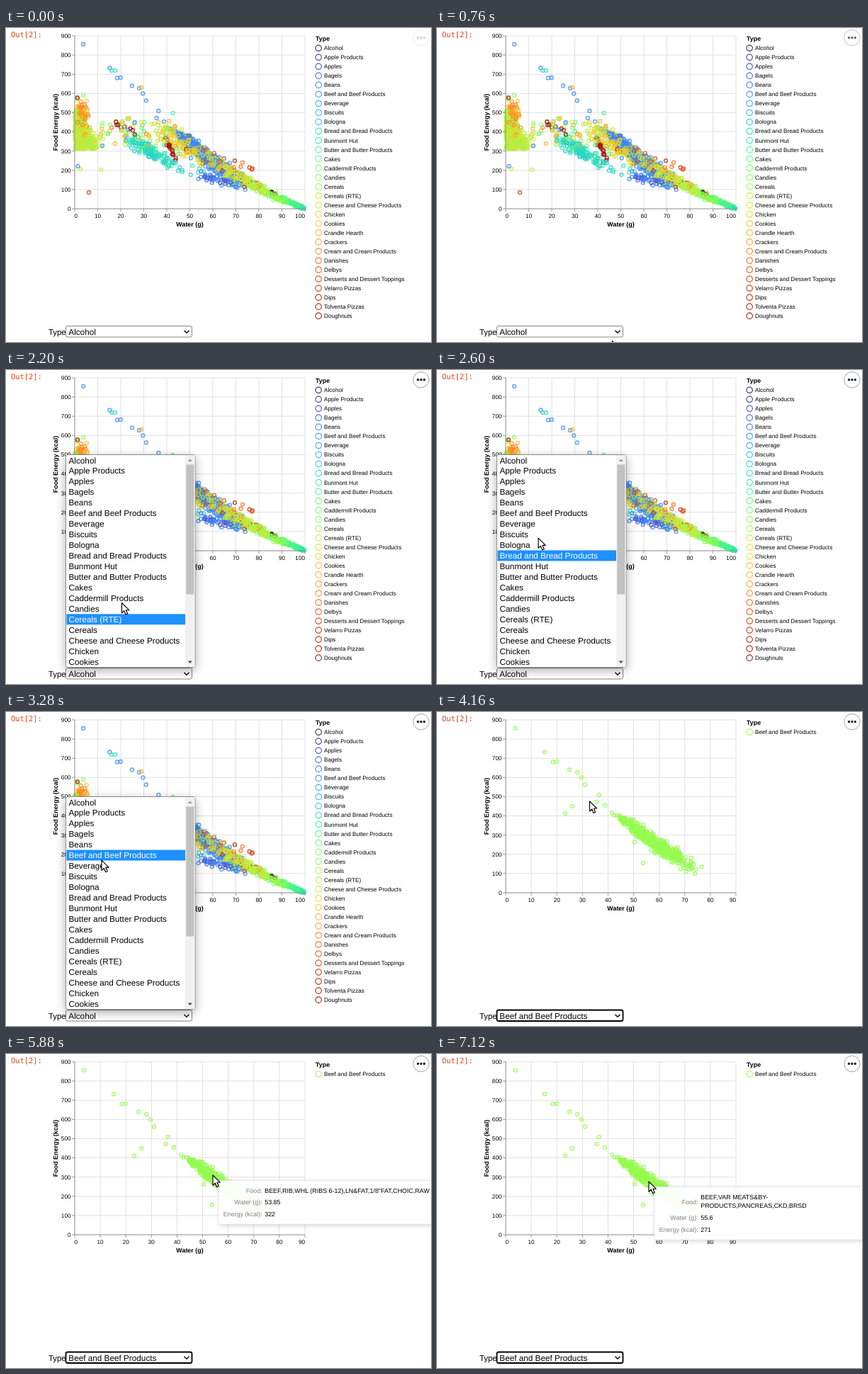
Recreate the animation shown at these times as an HTML page with a canvas. Size 600 px wide and 443 px high, loop 7200 ms.

```html
<!DOCTYPE html>
<html lang="en">
<head>
<meta charset="utf-8">
<title>Food energy by water content</title>
<style>
html, body { margin: 0; width: 100%; height: 100%; overflow: hidden; background: #fff; }
canvas, svg { position: absolute; left: 0; top: 0; width: 600px; height: 443px; }
text { font-family: "Liberation Sans", Arial, sans-serif; white-space: pre; text-rendering: geometricPrecision; }
.small { font-size: 8.2px; }
.bold { font-size: 8.94px; font-weight: bold; }
.tip { font-size: 8.94px; }
.form { font-size: 11.75px; }
.out { font: 10.4px "DejaVu Sans Mono", monospace; fill: #d84315; }
#list { filter: drop-shadow(0 4px 7px rgba(0,0,0,.33)); }
#tip rect { filter: drop-shadow(2px 2px 3px rgba(0,0,0,.14)); }
</style>
</head>
<body>
<canvas id="allPoints" width="600" height="443"></canvas>
<canvas id="beefPoints" width="600" height="443"></canvas>
<svg id="stage" viewBox="0 0 600 443"></svg>
<script>
const LOOP = 7200, STEP = 40;
const HOVER = 640, OPEN = 1720, PICK = 3360;
const L = 97, R = 422, T = 11, B = 255;
const ROW = 14.97, LIST_TOP = 120;

const types = ['Alcohol', 'Apple Products', 'Apples', 'Bagels', 'Beans', 'Beef and Beef Products',
  'Beverage', 'Biscuits', 'Bologna', 'Bread and Bread Products', 'Bunmont Hut',
  'Butter and Butter Products', 'Cakes', 'Caddermill Products', 'Candies', 'Cereals',
  'Cereals (RTE)', 'Cheese and Cheese Products', 'Chicken', 'Cookies', 'Crandle Hearth',
  'Crackers', 'Cream and Cream Products', 'Danishes', 'Delbys', 'Desserts and Dessert Toppings',
  'Velarro Pizzas', 'Dips', 'Tolventa Pizzas', 'Doughnuts'];
const BEEF = 5;
const options = types.slice(0, 20);
[options[15], options[16]] = [options[16], options[15]];

const clamp = (v, a, b) => Math.max(a, Math.min(b, v));

// Colour scale
const stops = ['2c1a3a', '44409a', '4569ee', '3295f7', '26bce1', '29dcbc', '3ff393', '65fd6e', '95fb51',
  'c5ec3c', 'e6d62e', 'ffad24', 'ff841e', 'f2570f', 'cc3509', 'a81e05', '820a00']
  .map(h => [0, 2, 4].map(i => parseInt(h.slice(i, i + 2), 16)));
function turbo(u) {
  const p = u * (stops.length - 1), i = Math.min(Math.floor(p), stops.length - 2);
  return `rgb(${stops[i].map((c, k) => Math.round(c + (stops[i + 1][k] - c) * (p - i)))})`;
}
const typeColor = i => turbo(i / (types.length - 1));

// Seeded noise
let seed = 7;
function rnd() {
  seed = (seed + 0x6D2B79F5) | 0;
  let a = Math.imul(seed ^ (seed >>> 15), 1 | seed);
  a = (a + Math.imul(a ^ (a >>> 7), 61 | a)) ^ a;
  return ((a ^ (a >>> 14)) >>> 0) / 4294967296;
}
const gauss = () => (rnd() + rnd() + rnd() - 1.5) * 2;

// Piecewise linear lookup in rows of [key, value, value...]
function along(rows, k) {
  let i = 1;
  while (i < rows.length - 1 && rows[i][0] < k) i++;
  const a = rows[i - 1], b = rows[i];
  const u = clamp((k - a[0]) / (b[0] - a[0]), 0, 1);
  return a.slice(1).map((v, j) => v + (b[j + 1] - v) * u);
}

// Beef, in pixels of the 0-90 axis: lean outliers, then the dense band
const beef = [[110.5, 23], [152, 56.5], [163.5, 70.5], [169, 70], [187, 81.5], [198, 85], [204, 92.5],
  [209, 102.5], [228.5, 117], [225.5, 127], [237, 132], [191, 133], [181, 143.5], [291, 213], [279, 183.5]];
for (let i = 0; i < 10; i++) beef.push([247 + 3.6 * i, 144 + i * 1.3 + gauss() * 2]);
const beefLine = [[258, 150], [300, 181], [357, 215], [412, 237]];
for (let i = 0; i < 460; i++) {
  const x = clamp(305 + gauss() * 26, 258 + 8 * rnd(), 408);
  beef.push([x, along(beefLine, x)[0] + gauss() * Math.min(5.5, 2 + (x - 258) / 8)]);
}

// All foods, in pixels of the 0-100 axis
const dots = beef.map(([x, y]) => ({ type: BEEF, x: L + (x - L) * 0.9, y, z: rnd() * 0.75 }));
function scatter(n, type, spread, place) {
  for (let i = 0; i < n; i++) {
    const u = rnd(), [x, y] = place(u);
    dots.push({
      type: clamp(Math.round(type(u) + gauss() * spread), 0, types.length - 1),
      x: Math.min(L + Math.abs(x - L), 421), y: Math.min(y, 254.5), z: rnd()
    });
  }
}
const only = type => () => type;
const band = x => along([[215, 143], [255, 167], [300, 193], [340, 217], [380, 237], [421, 254.5]], x)[0];

// main band: yellow at the dry end, green to cyan towards pure water
scatter(620, u => 18 - 8 * u ** 3, 1.1, u => {
  const x = 215 + 206 * u ** 0.85;
  return [x, band(x) + gauss() * (0.8 + (421 - x) * 0.04)];
});
scatter(45, only(24), 1.8, u => { const x = 250 + 110 * u; return [x, band(x) - 4 + gauss() * 8]; });
scatter(45, only(4), 0.8, u => [272 + 55 * u, 207 + 14 * u + gauss() * 3]);
scatter(6, only(0), 0.5, u => [374 + 9 * u, 231 + 5 * u]);
// dry goods with a hard lower edge
scatter(400, only(16), 1.2, () => {
  const x = L + Math.abs(gauss()) * 15;
  return [x, 171 - Math.abs(gauss()) * (9 + 25 * Math.exp((L - x) / 12))];
});
scatter(75, only(21), 1.3, () => [108 + gauss() * 5, 127 + gauss() * 11]);
// breads, and the sparse middle
scatter(115, only(9), 0.8, () => { const x = 203 + gauss() * 16; return [x, 175 + (x - 203) * 0.55 + gauss() * 5]; });
scatter(14, only(9), 0.5, u => [225 + 55 * u, 189 + 14 * u + gauss() * 5]);
scatter(75, only(16), 3, u => [135 + 110 * u, 140 + 18 * u + gauss() * 10]);
// doughnuts and dips
scatter(8, only(29), 0.3, u => [149 + 36 * u, 134 + 13 * u + gauss() * 4]);
scatter(18, only(28), 0.6, u => [225 + 15 * u, 158 + 27 * u + gauss() * 3]);
scatter(7, only(28), 0.6, u => [331 + 16 * u, 215 + 6 * u + gauss() * 2]);
// lone foods
for (const [type, x, y] of [[9, 149, 60], [9, 154, 60], [20, 191, 84], [14, 109, 95], [11, 235.5, 120],
  [16, 105, 199], [16, 134, 200], [25, 117, 232], [5, 101.5, 195], [28, 101, 98.5], [5, 136, 166]])
  dots.push({ type, x, y, z: 1 });

function plot(id, nx) {
  const g = document.getElementById(id).getContext('2d');
  g.strokeStyle = '#ddd';
  g.lineWidth = 0.9;
  const line = (a, b, c, d) => { g.beginPath(); g.moveTo(a, b); g.lineTo(c, d); g.stroke(); };
  for (let i = 0; i <= nx; i++) { const x = L + (R - L) * i / nx; line(x, T, x, B); }
  for (let i = 0; i <= 9; i++) { const y = B - (B - T) * i / 9; line(L, y, R, y); }
  g.globalAlpha = 0.72;
  g.lineWidth = 1.6;
  return (color, x, y) => {
    g.strokeStyle = color;
    g.beginPath();
    g.arc(x, y, 2.4, 0, 7);
    g.stroke();
  };
}
const dotAll = plot('allPoints', 10), dotBeef = plot('beefPoints', 9);
for (const [x, y] of beef) dotBeef(turbo(0.5), x, y);
for (const d of dots.sort((a, b) => a.z - b.z)) dotAll(typeColor(d.type), d.x, d.y);

// SVG helpers
const stage = document.getElementById('stage');
function add(parent, tag, attrs = {}, content) {
  const e = document.createElementNS('http://www.w3.org/2000/svg', tag);
  for (const k in attrs) e.setAttribute(k, attrs[k]);
  if (content !== undefined) e.textContent = content;
  return parent.appendChild(e);
}
const label = (parent, cls, x, y, s, anchor = 'start', fill = '#000') =>
  add(parent, 'text', { class: cls, x, y, 'text-anchor': anchor, fill }, s);
const show = (e, on) => { e.style.display = on ? '' : 'none'; };

label(stage, 'out', 7, 13, 'Out[2]:');

// Axes
let ticks = `M${L} ${T}V${B}H${R}`;
for (let i = 0; i <= 9; i++) {
  const y = B - (B - T) * i / 9;
  ticks += `M${L} ${y}h-4`;
  label(stage, 'small', 91.5, y + 2.9, i * 100, 'end');
}
add(stage, 'path', { d: ticks, fill: 'none', stroke: '#888', 'stroke-width': 0.85 });
label(stage, 'bold', 259.5, 280, 'Water (g)', 'middle');
add(stage, 'text', { class: 'bold', 'text-anchor': 'middle', transform: 'translate(73 133) rotate(-90)' },
  'Food Energy (kcal)');
label(stage, 'bold', 437, 18, 'Type');

function view(nx, entries) {
  const g = add(stage, 'g');
  let d = '';
  for (let i = 0; i <= nx; i++) {
    const x = L + (R - L) * i / nx;
    d += `M${x} ${B}v4`;
    label(g, 'small', i ? x : x - 0.5, 268, i * 10, i === 0 ? 'start' : i === nx ? 'end' : 'middle');
  }
  add(g, 'path', { d, stroke: '#888', 'stroke-width': 0.85 });
  entries.forEach(([name, color], i) => {
    const y = 28.3 + 13.03 * i;
    add(g, 'circle', { cx: 441.2, cy: y, r: 4.2, fill: 'none', stroke: color, 'stroke-width': 1.25, opacity: 0.85 });
    label(g, 'small', 449, y + 2.9, name);
  });
  return g;
}
const allView = view(10, types.map((s, i) => [s, typeColor(i)]));
const beefView = view(9, [[types[BEEF], turbo(0.5)]]);

// Menu button
const menu = add(stage, 'g');
add(menu, 'circle', { cx: 586, cy: 13.8, r: 11.2, fill: '#fff', stroke: '#999', 'stroke-width': 0.9 });
for (const dx of [-4.4, 0, 4.4]) add(menu, 'circle', { cx: 586 + dx, cy: 13.8, r: 1.7, fill: '#1b1e23' });

// Select box
add(stage, 'text', { class: 'form', x: 60, y: 433, style: 'font-size:11.4px' }, 'Type');
const box = add(stage, 'rect', { x: 84.5, y: 420.5, width: 178, height: 15.5, rx: 2.5, fill: '#fff' });
const chosen = label(stage, 'form', 88.3, 432.6, '');
add(stage, 'path', { d: 'M251.5 426.7l3.5 3.5 3.5-3.5', fill: 'none', stroke: '#111', 'stroke-width': 1.6 });

// Option list
const list = add(stage, 'g', { id: 'list' });
add(list, 'rect', { x: 84.5, y: 119.5, width: 182.5, height: 300, rx: 3, fill: '#fff', stroke: '#858585', 'stroke-width': 0.9 });
add(list, 'rect', { x: 253, y: 120, width: 13.5, height: 299, fill: '#f1f1f1' });
add(list, 'rect', { x: 254.3, y: 133.5, width: 11, height: 183, fill: '#c1c1c1' });
add(list, 'path', { d: 'M256.8 129l3-3.4 3 3.4z', fill: '#999' });
add(list, 'path', { d: 'M256.8 410.6l3 3.4 3-3.4z', fill: '#444' });
const bar = add(list, 'rect', { x: 85.5, width: 167.5, height: 15, fill: '#1e90ff' });
const rows = options.map((s, i) => label(list, 'form', 88.5, LIST_TOP + ROW * i + 11.5, s));

// Tooltip
const notes = [
  [4640, ['BEEF,TENDERLOIN,RST,LN & FAT,1/8"', 'FAT,PRIME,CKD,RSTD'], '48.28', '343'],
  [5560, ['BEEF,RIB,WHL (RIBS 6-12),LN&FAT,1/8"FAT,CHOIC,RAW'], '53.85', '322'],
  [6520, ['BEEF,VAR MEATS&BY-', 'PRODUCTS,PANCREAS,CKD,BRSD'], '55.6', '271']];
const tip = add(stage, 'g', { id: 'tip' });
const cards = notes.map(([, lines, water, energy]) => {
  const g = add(tip, 'g'), extra = (lines.length - 1) * 13;
  add(g, 'rect', { width: 317, height: 62 + extra, rx: 2.5, fill: '#fff', 'fill-opacity': 0.95, stroke: '#ddd', 'stroke-width': 0.8 });
  lines.forEach((s, i) => label(g, 'tip', 65.5, 17.8 + 12.4 * i, s));
  const row = (name, y) => label(g, 'tip', 62, y, name, 'end', '#808080');
  row('Food:', 17.8 + extra / 2);
  [['Water (g):', water, 34], ['Energy (kcal):', energy, 50.3]].forEach(([name, value, y]) => {
    row(name, y + extra);
    label(g, 'tip', 65.5, y + extra, value);
  });
  return g;
});

// Pointer
const pointer = add(stage, 'path', {
  d: 'M0 0V14.2L3.3 11.2 5.6 16.6 8.2 15.5 5.9 10.2H10.2Z',
  fill: '#fff', stroke: '#000', 'stroke-width': 1.15, 'stroke-linejoin': 'round'
});
const route = [[600, 252, 452], [1160, 236, 415.5], [1480, 236, 415.5], [1720, 232, 425],
  [2200, 163.5, 328.5], [2640, 141, 228], [3000, 135, 209.2], [3480, 135, 209.2], [4240, 225, 116],
  [4760, 274, 161], [5160, 274, 161], [5880, 292, 171], [6560, 299, 180]];

function draw(t) {
  const picked = t >= PICK, open = t >= OPEN && !picked;
  const [x, y] = along(route, t);

  show(document.getElementById('allPoints'), !picked);
  show(document.getElementById('beefPoints'), picked);
  show(allView, !picked);
  show(beefView, picked);
  menu.setAttribute('opacity', 0.2 + 0.8 * clamp((t - HOVER) / 200, 0, 1));

  chosen.textContent = types[picked ? BEEF : 0];
  box.setAttribute('stroke', picked ? '#000' : '#767676');
  box.setAttribute('stroke-width', picked ? 1.8 : 0.9);

  show(list, open);
  if (open) {
    // the highlight trails the pointer a little
    const at = Math.floor((along(route, t - 100)[1] - LIST_TOP) / ROW);
    const hot = at < rows.length ? at : 0;
    bar.setAttribute('y', LIST_TOP + ROW * hot - 0.3);
    rows.forEach((r, i) => r.setAttribute('fill', i === hot ? '#fff' : '#000'));
  }

  const current = notes.filter(n => t >= n[0]).length - 1;
  cards.forEach((c, i) => show(c, i === current));
  tip.setAttribute('transform', `translate(${x + 7.7} ${y + 7.3})`);

  show(pointer, t > 600);
  pointer.setAttribute('transform', `translate(${x} ${y})`);
}

const start = performance.now();
function tick() {
  const t = (performance.now() - start) % LOOP;
  draw(Math.floor(t / STEP) * STEP);
  requestAnimationFrame(tick);
}
tick();
</script>
</body>
</html>
```
